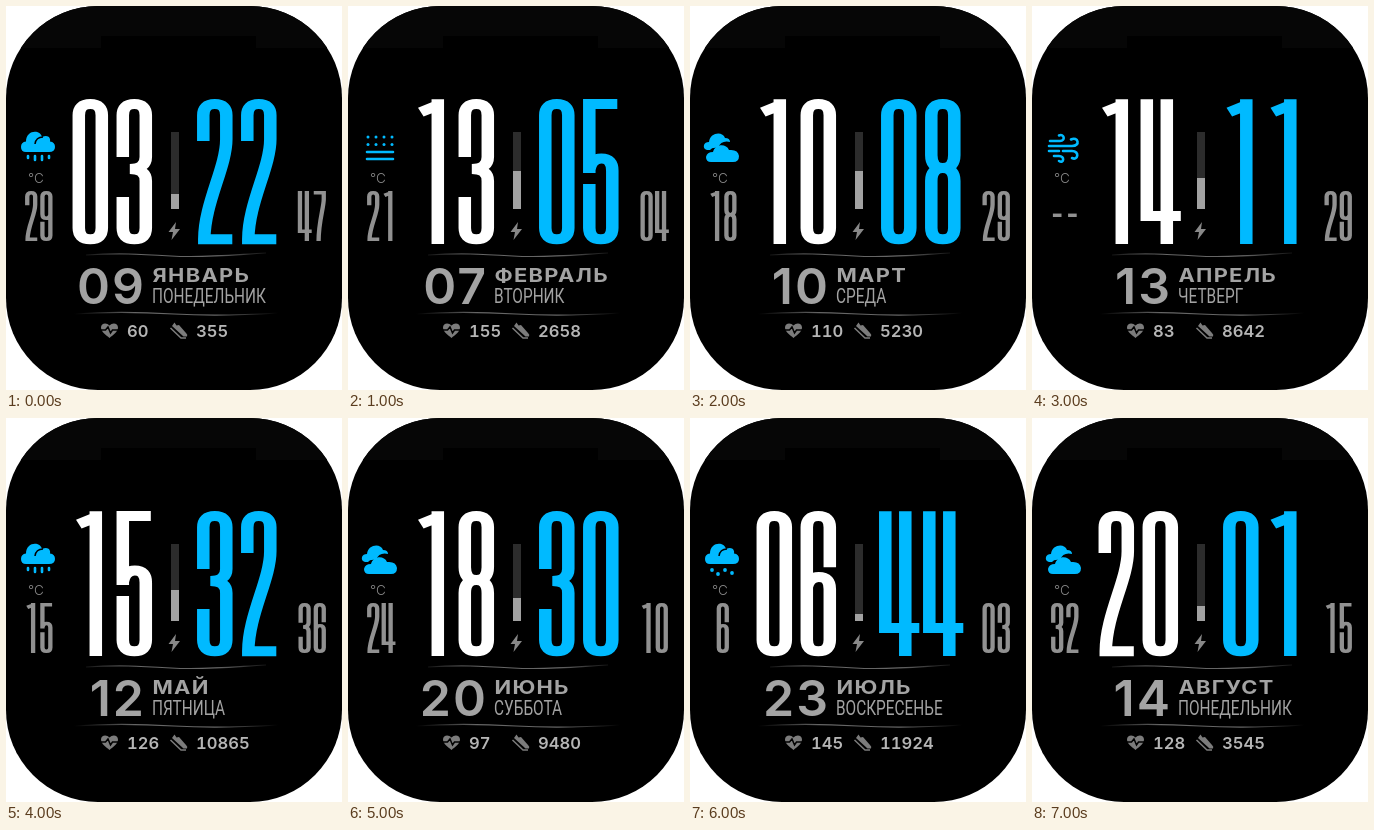
Write an HTML page that moves like this. It is 336x384 px and loops after 8000 ms.

```html
<!DOCTYPE html>
<html lang="ru">
<head>
<meta charset="utf-8">
<title>Циферблат</title>
<style>
  html, body { margin: 0; width: 336px; height: 384px; overflow: hidden; background: #fff; }
  svg { display: block; }
  text { font-family: Inter, sans-serif; fill: #a3a3a3; }
  .digits path { fill: none; stroke: currentColor; stroke-width: 12.5; }
  #hours { color: #fff; }
  #minutes, #weather { color: #00baff; }
  #temp, #seconds { color: #919191; }
  #day { font-size: 50px; font-weight: 600; letter-spacing: 2px; text-anchor: end; }
  #month { font-size: 18.5px; font-weight: 700; letter-spacing: 1.1px; }
  #weekday { font-family: Roboto, sans-serif; font-size: 20px; }
  .stat { font-size: 16.6px; font-weight: 600; font-variant-numeric: tabular-nums; fill: #b5b5b5; }
  .unit { font-size: 13.5px; font-weight: 300; fill: #8a8a8a; }
  .fill { fill: currentColor; }
  .line { fill: none; stroke: currentColor; stroke-width: 2.6; stroke-linecap: round; }
  .cut { fill: none; stroke: #000; stroke-width: 1.5; }
</style>
</head>
<body>
<svg width="336" height="384" viewBox="0 0 336 384">
  <defs>
    <linearGradient id="fade" gradientUnits="userSpaceOnUse" x1="68" x2="272" y1="0" y2="0">
      <stop offset="0" stop-color="#666" stop-opacity="0"/>
      <stop offset=".3" stop-color="#666"/>
      <stop offset=".7" stop-color="#666"/>
      <stop offset="1" stop-color="#666" stop-opacity="0"/>
    </linearGradient>
    <clipPath id="screen"><rect width="336" height="384" rx="92"/></clipPath>
  </defs>
  <g clip-path="url(#screen)">
    <rect width="336" height="384"/>
    <path d="M0 0H336V42H250V30H95V42H0Z" fill="#060606"/>
  </g>

  <g id="hours" class="digits"></g>
  <g id="minutes" class="digits"></g>
  <g id="temp" class="digits"></g>
  <g id="seconds" class="digits"></g>

  <rect x="165" y="126" width="8" height="77" fill="#2c2c2c"/>
  <rect id="level" x="165" width="8" fill="#a2a2a2"/>
  <path d="M170 216L162.500 226H167L165.500 234L174 223H169Z" fill="#888"/>

  <g id="weather"></g>
  <text class="unit" x="22" y="177">°C</text>

  <g fill="none" stroke="url(#fade)" stroke-width="1.200">
    <path d="M80 249C112 247 132 248 165 250S225 249 260 247"/>
    <path d="M68 308C108 305 135 306 168 308S225 310 272 307"/>
  </g>
  <text id="day" x="140" y="297.500"></text>
  <text id="month" transform="translate(146.500 276) scale(1.18 1)"></text>
  <text id="weekday" transform="translate(146 297) scale(.77 1)"></text>

  <path d="M103.500 332C100 329 95 326 95 321.500C95 317 100.500 316 103.500 319.500C106.500 316 112 317 112 321.500C112 326 107 329 103.500 332Z" fill="#7c7c7c"/>
  <path class="cut" d="M94 324H99.500L102 321L104.500 327L106.500 324H113"/>
  <text id="pulse" class="stat" x="121" y="330.500"></text>
  <g fill="#7c7c7c">
    <path d="M166 320L168.500 316.500L170.500 319.500L173 319L180 327Q182 328.500 181 330.500H177.500Z"/>
    <path d="M164.500 322L175 332H180" fill="none" stroke="#7c7c7c" stroke-width="1.500"/>
  </g>
  <text id="steps" class="stat" x="190" y="330.500"></text>
</svg>

<script>
const $ = id => document.getElementById(id);

// Condensed numerals on a 35 x 181 grid, drawn as strokes
const GLYPHS = {
  0: 'M6 20Q6 6 17.5 6T29 20V161Q29 175 17.5 175T6 161Z',
  1: 'M23 181V0M6 16L22 8',
  2: 'M6 52V20Q6 6 17.5 6T29 20V50C29 85 7 130 7 175H35',
  3: 'M6 72V20Q6 6 17.5 6T29 20V72Q29 87 13 87M13 87Q29 87 29 102V161Q29 175 17.5 175T6 161V122',
  4: 'M4 0V146H38M24 0V181',
  5: 'M34 6H6V92M6 88Q8 74 18 74Q29 74 29 89V161Q29 175 17.5 175T6 161V106',
  6: 'M29 70V20Q29 6 17.5 6T6 20V161Q6 175 17.5 175T29 161V97Q29 82 18 82Q8 82 6 95',
  7: 'M0 6H29V30C29 60 14 110 14 181',
  8: 'M17.5 86Q6 86 6 70V20Q6 6 17.5 6T29 20V70Q29 86 17.5 86Q6 86 6 102V161Q6 175 17.5 175T29 161V102Q29 86 17.5 86Z',
  9: 'M6 111V161Q6 175 17.5 175T29 161V20Q29 6 17.5 6T6 20V84Q6 99 17 99Q27 99 29 86',
  '-': 'M5 88H30'
};

const fill = d => `<path class="fill" d="${d}"/>`;
const line = d => `<path class="line" d="${d}"/>`;
const cut = d => `<path class="cut" d="${d}"/>`;
const dots = (r, ...points) =>
  points.map(([x, y]) => `<circle class="fill" cx="${x}" cy="${y}" r="${r}"/>`).join('');
const row = y => dots(1.5, ...[20, 28, 36, 44].map(x => [x, y]));

const CLOUD = fill('M20 146Q15 146 15 141Q15 136 20 135.500C20 124 34 123 36 131C42 128 45 132 44 135.500Q49 136 49 141Q49 146 43 146Z') +
  cut('M29 138Q30 131 37 131');
const WEATHER = {
  rain: CLOUD + line('M22 150V152M29 150V154M36 150V154M43 150V152'),
  snow: CLOUD + dots(1.9, [22, 152], [28, 156], [35, 152], [42, 155]),
  hail: row(131) + row(138.5) + line('M19 146H45M19 153H45'),
  wind: line('M18 135H28C34 135 32 127 27 129.500M17 140H40C49 140 46 130 39 133.500M17 145H27M22 150H27C33 150 32 158 27 155M31 145H40C48 145 46 155 40 152'),
  cloudy: fill('M17 144Q13 143 14 139Q15 136 19 136C20 126 33 125 35 132Q40 132 40 136Q31 134 28 142Q22 141 20 144Z') +
    fill('M21 156Q16 156 16 151Q17 146 23 146C25 138 36 137 39 144Q48 143 49 150Q49 156 43 156Z')
};

// hours, minutes, seconds, temperature, weather, level, day, month, weekday, pulse, steps
const STEPS = [
  ['03', '22', '47', '29', 'rain', 15, '09', 'ЯНВАРЬ', 'ПОНЕДЕЛЬНИК', 60, 355],
  ['13', '05', '04', '21', 'hail', 38, '07', 'ФЕВРАЛЬ', 'ВТОРНИК', 155, 2658],
  ['10', '08', '29', '18', 'cloudy', 38, '10', 'МАРТ', 'СРЕДА', 110, 5230],
  ['14', '11', '29', '--', 'wind', 31, '13', 'АПРЕЛЬ', 'ЧЕТВЕРГ', 83, 8642],
  ['15', '32', '36', '15', 'rain', 31, '12', 'МАЙ', 'ПЯТНИЦА', 126, 10865],
  ['18', '30', '10', '24', 'cloudy', 23, '20', 'ИЮНЬ', 'СУББОТА', 97, 9480],
  ['06', '44', '03', '6', 'snow', 7, '23', 'ИЮЛЬ', 'ВОСКРЕСЕНЬЕ', 145, 11924],
  ['20', '01', '15', '32', 'cloudy', 15, '14', 'АВГУСТ', 'ПОНЕДЕЛЬНИК', 128, 3545]
];

function setDigits(id, value, center, y, scale) {
  const pitch = 44 * scale;
  const left = center - (pitch * value.length - 9 * scale) / 2;
  $(id).innerHTML = [...value].map((c, i) =>
    `<path d="${GLYPHS[c]}" transform="translate(${left + i * pitch} ${y}) scale(${scale} ${scale * .8})"/>`
  ).join('');
}

function show([hours, minutes, seconds, temp, weather, level, day, month, weekday, pulse, steps]) {
  setDigits('hours', hours, 106.3, 93.3, 1);
  setDigits('minutes', minutes, 230.8, 93.3, 1);
  setDigits('seconds', seconds, 306.2, 185, .345);
  setDigits('temp', temp, 32.8, 185, .345);
  $('weather').innerHTML = WEATHER[weather];
  $('level').setAttribute('y', 203 - level);
  $('level').setAttribute('height', level);
  for (const [id, value] of Object.entries({ day, month, weekday, pulse, steps })) {
    $(id).textContent = value;
  }
}

let current = -1;
function tick() {
  const i = Math.floor(performance.now() / 1000) % STEPS.length;
  if (i !== current) show(STEPS[current = i]);
  requestAnimationFrame(tick);
}
tick();
</script>
</body>
</html>
```
